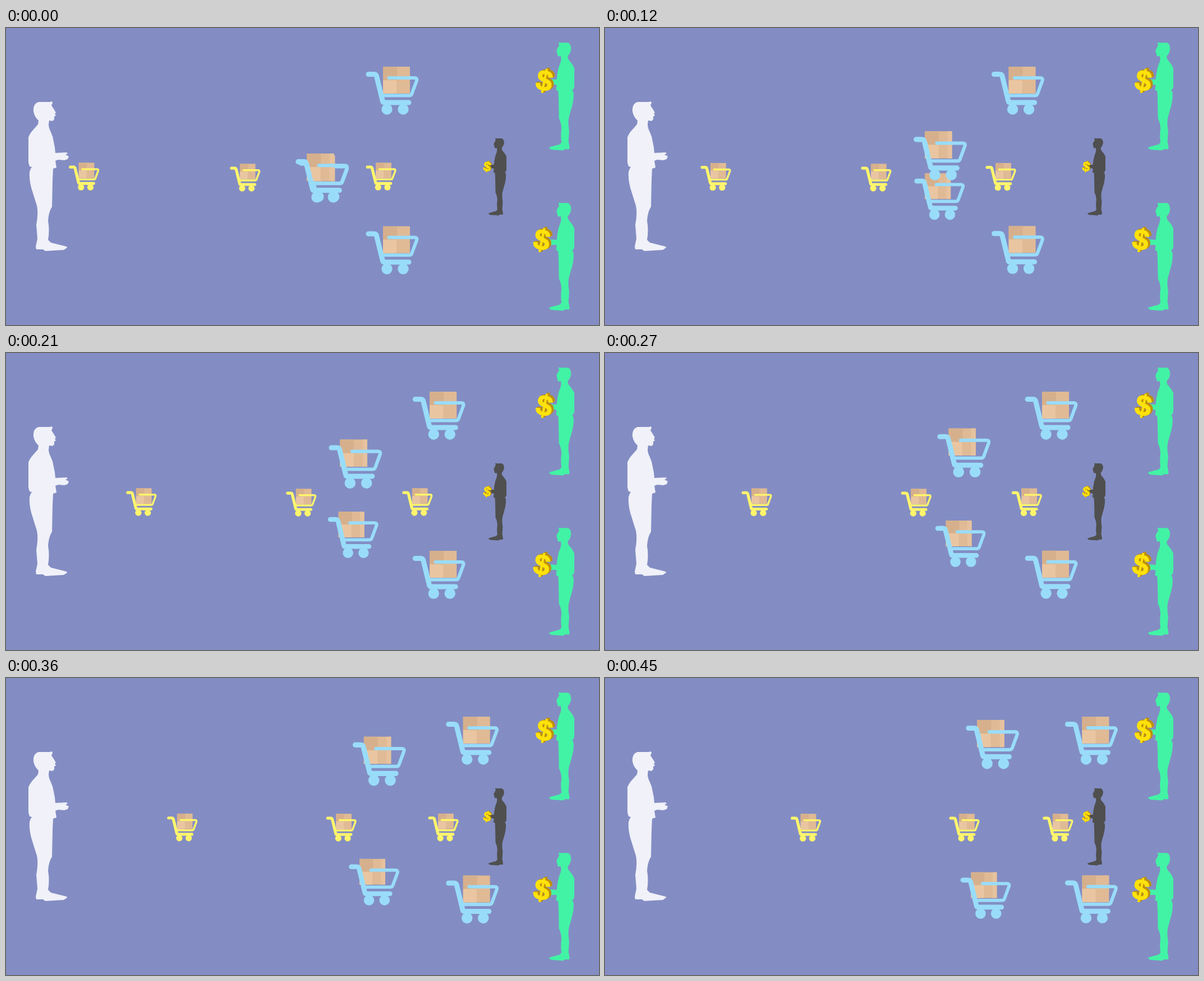
These frames come from a looping animation (1057 px wide and 530 px high, 0.48 s). An HTML page with a canvas:

```html
<!DOCTYPE html>
<html lang="en">
<head>
<meta charset="utf-8">
<title>Carts</title>
<style>
html, body { margin: 0; width: 100%; height: 100%; overflow: hidden; background: #838dc3; }
canvas { display: block; }
</style>
</head>
<body>
<canvas id="stage" width="1057" height="530"></canvas>
<script>
const ctx = document.getElementById('stage').getContext('2d');
const STEP = 30, STEPS = 16;
const BLUE = '#99dcf9', YELLOW = '#fff56c';

// Side view of a standing person, relative to the left and top edges
const person = new Path2D('M18 1 L38 1 L42 0 L43 3 L41 7 L46 15 L49 20 L47 22 L49 25 L46 27 L46 32 ' +
  'L43 35 L37 34 L36 41 Q36 47 40 55 Q44 63 45 72 L47 82 L48 92 L68 91 L70 93 L66 95 L72 98 ' +
  'L70 103 L64 105 L53 104 L48 106 L50 118 L44 120 L43 140 L42 188 Q36 197 35 213 ' +
  'Q38 230 35 247 L40 252 L56 256 L68 259 L69 261 L63 265 L30 267 L26 264 L14 264 L13 259 ' +
  'L16 245 L14 220 Q18 199 15 186 L5 154 Q1 138 2 126 Q3 121 6 117 L2 116 L0 109 L0 64 ' +
  'Q3 56 10 49 L17 41 L18 34 Q11 28 9 18 Q8 4 18 1 Z');

const frame = new Path2D('M5 13.5 H15 Q18.5 13.5 19.5 17 L30.5 62 Q31 64 33 64 H77');
const basket = new Path2D('M41.5 20 H87 Q92.5 20 91 25 L82.5 48 Q81.3 51.5 78 51.5 H29');

function drawPerson(x, y, sx, sy, color) {
  ctx.save();
  ctx.translate(x, y);
  ctx.scale(sx, sy);
  ctx.fillStyle = color;
  ctx.fill(person);
  ctx.restore();
}

function drawDollar(x, y, size, depth) {
  ctx.save();
  ctx.font = `bold ${size}px "Liberation Sans", Arial, sans-serif`;
  ctx.textAlign = 'center';
  ctx.lineJoin = 'round';
  ctx.lineWidth = size * 0.025;
  const glyph = (dx, dy, color) => {
    ctx.save();
    ctx.translate(x + dx, y + dy);
    ctx.rotate(0.2);
    ctx.fillStyle = ctx.strokeStyle = color;
    ctx.fillText('$', 0, size * 0.33);
    ctx.strokeText('$', 0, size * 0.33);
    ctx.restore();
  };
  for (let d = depth; d > 0; d -= 0.5) glyph(d, -d * 0.5, '#bd900f');
  glyph(0, 0, '#ffe20a');
  ctx.restore();
}

function rect(x, y, w, h, color) {
  ctx.fillStyle = color;
  ctx.fillRect(x, y, w, h);
}

function drawBox(x, y, striped) {
  rect(x, y, 48, 48, '#e0ba95');
  rect(x, y, 25, 24, '#d6b08c');
  rect(x, y + 24, 24, 24, '#e9c6a1');
  if (striped) rect(x + 40, y, 8, 48, '#e6c29e');
}

function drawCart(x, y, scale, color, tilted) {
  ctx.save();
  ctx.translate(x, y);
  ctx.scale(scale, scale);
  if (tilted) drawBox(20.3, -1, true);
  else drawBox(31, 0, false);
  ctx.strokeStyle = ctx.fillStyle = color;
  ctx.lineCap = ctx.lineJoin = 'round';
  ctx.lineWidth = 9;
  ctx.stroke(frame);
  ctx.lineWidth = 6;
  ctx.stroke(basket);
  for (const cx of [38, 67]) {
    ctx.beginPath();
    ctx.arc(cx, 76, 9.7, 0, Math.PI * 2);
    ctx.fill();
  }
  ctx.restore();
}

// Start, travel per step, scale, colour, tilted load
const carts = [
  [641, 69, 11.9, 0, 1, BLUE],
  [641, 353.8, 11.9, -0.11, 1, BLUE],
  [520.9, 228.4, 7.48, 7.95, 0.957, BLUE, true],
  [515.7, 225, 8.47, -9.94, 1.01, BLUE, true],
  [111.8, 240.4, 14.6, 0.13, 0.577, YELLOW],
  [399, 242.3, 14.28, 0, 0.577, YELLOW],
  [641.3, 240.4, 9.25, 0.13, 0.577, YELLOW]
];

function draw(now) {
  const n = Math.floor(now / STEP) % STEPS;
  rect(0, 0, 1057, 530, '#838dc3');
  drawPerson(40, 131, 1, 1, '#f0f1f9');
  drawPerson(1013, 25.5, -0.652, 0.723, '#42f3a5');
  drawPerson(1013, 311.5, -0.652, 0.723, '#42f3a5');
  drawPerson(892, 196.5, -0.464, 0.517, '#4f4f4f');
  drawDollar(959.5, 94.5, 52, 4);
  drawDollar(955, 378.5, 52, 4);
  drawDollar(857.5, 247.5, 24, 1.5);
  for (const [x, y, dx, dy, scale, color, tilted] of carts) {
    drawCart(x + dx * n, y + dy * n, scale, color, tilted);
  }
}

const start = performance.now();
function tick() {
  draw(performance.now() - start);
  requestAnimationFrame(tick);
}
tick();
</script>
</body>
</html>
```
